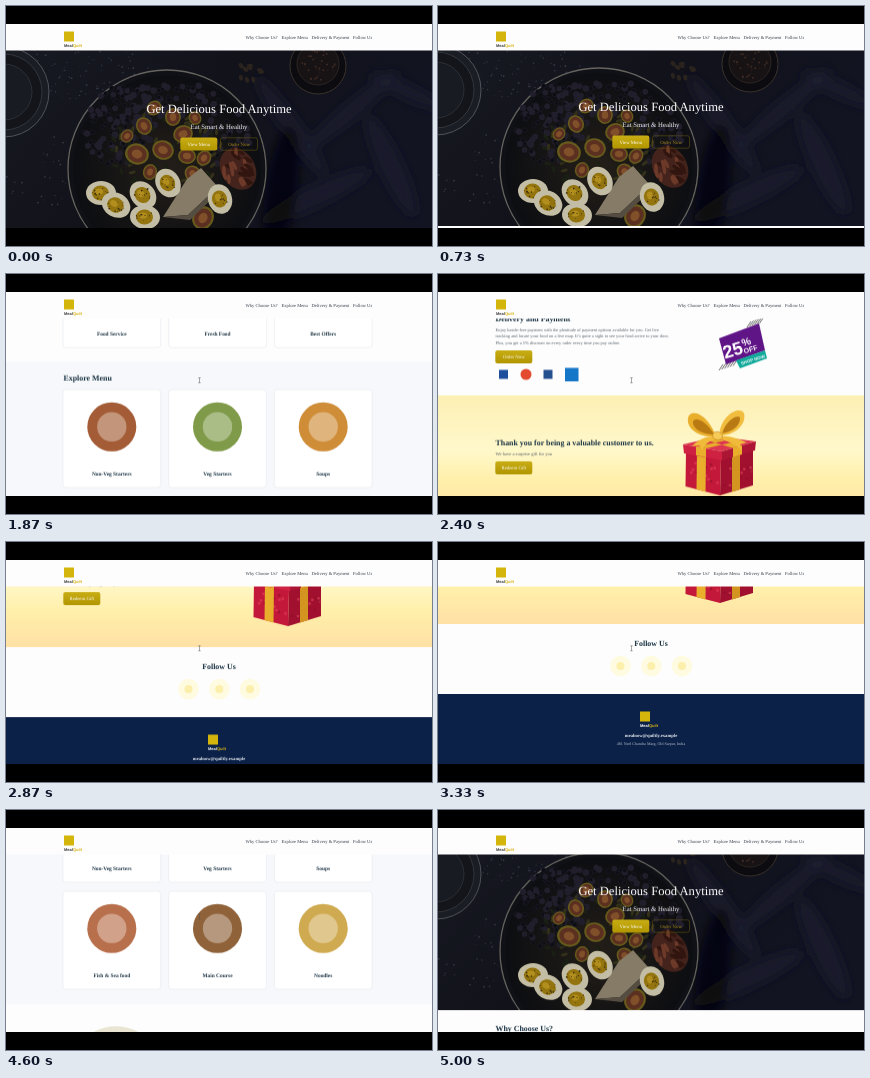
Recreate the animation shown at these times as an HTML page. Size 426x240 px, loop 5.07 s.

```html
<!DOCTYPE html>
<html lang="en">
<head>
<meta charset="utf-8">
<title>Food ordering page</title>
<style>
  html, body { margin: 0; width: 100%; height: 100%; overflow: hidden; background: #000; }
  svg { display: block; width: 100vw; height: 100vh; }
  text { font-family: "Liberation Serif", "Times New Roman", serif; text-rendering: geometricPrecision; white-space: pre; }
  .brand { font-family: "Liberation Sans", Arial, sans-serif; font-weight: bold; }
</style>
</head>
<body>
<svg id="stage" viewBox="0 0 426 240" xmlns="http://www.w3.org/2000/svg"></svg>
<script>
const LOOP = 5070, STEPS = 76;
const INK = '#1c3444', BODY = '#56616b';

// Drawing helpers
const rect = (x, y, w, h, fill, extra = '') =>
  `<rect x="${x}" y="${y}" width="${w}" height="${h}" fill="${fill}" ${extra}/>`;
const disc = (x, y, r, fill, extra = '') =>
  `<circle cx="${x}" cy="${y}" r="${r}" fill="${fill}" ${extra}/>`;
const oval = (x, y, rx, ry, turn, fill, extra = '') =>
  `<ellipse rx="${rx}" ry="${ry}" fill="${fill}" transform="translate(${x} ${y}) rotate(${turn})" ${extra}/>`;
const path = (d, fill, extra = '') => `<path d="${d}" fill="${fill}" ${extra}/>`;
const label = (x, y, size, str, fill, extra = '') =>
  `<text x="${x}" y="${y}" font-size="${size}" fill="${fill}" ${extra}>${str}</text>`;
const MID = 'text-anchor="middle"', BOLD = 'font-weight="bold"';
const heading = (x, y, str, extra = '') => label(x, y, 7.9, str, INK, `${BOLD} ${extra}`);
const lines = (x, y, rows) =>
  rows.map((row, i) => label(x, y + i * 6.6, 4.45, row, BODY)).join('');
const button = (x, y, str) =>
  rect(x, y, 37, 13, 'url(#gold)', 'rx="2"') + label(x + 18.5, y + 8.2, 4.8, str, '#fff', MID);
const shift = (y, body) => `<g transform="translate(0 ${y})">${body}</g>`;

function random(seed) {
  return () => (seed = (seed * 16807) % 2147483647) / 2147483647;
}

function scatter(n, seed, cx, cy, rx, ry, draw) {
  const rnd = random(seed);
  let out = '';
  for (let i = 0; i < n; i++) {
    const a = rnd() * 2 * Math.PI, d = Math.sqrt(rnd());
    out += draw(cx + Math.cos(a) * d * rx, cy + Math.sin(a) * d * ry, rnd());
  }
  return out;
}

const brand = (x, y, first) =>
  rect(x, y, 10, 10, '#d3b50b') +
  `<text class="brand" x="${x}" y="${y + 15.3}" font-size="4" fill="${first}">Meal<tspan fill="#d8b414">Quilt</tspan></text>`;

// Dark table with a round dish of figs, eggs and berries
function hero() {
  const berry = (x, y, v) => disc(x, y, 1.8 + v * 1.4, v > .5 ? '#211e2c' : '#0d0d14', 'stroke="#2b2836" stroke-width=".4"');
  const leaf = (x, y, v) => oval(x, y, 3.5, 1.6, v * 180, v > .5 ? '#33301a' : '#1b2015');
  const crumb = (x, y, v) => disc(x, y, .4 + v * .5, '#363a48');
  const fig = ([x, y, r]) =>
    oval(x, y, r, r * .88, x * 7, '#665a1c') + oval(x, y, r * .82, r * .7, x * 7, '#5c3020') +
    oval(x, y, r * .45, r * .36, x * 7, '#80502a');
  const egg = ([x, y, turn]) =>
    oval(x, y, 15, 12, turn, '#c2bda4') + oval(x - .5, y, 8.5, 7.5, turn, '#94740e') +
    oval(x - 2, y - 1.5, 4, 3, turn, '#b28f1d') +
    scatter(12, x, x, y, 9, 7, (px, py, v) => disc(px, py, .4 + v * .5, '#3d300f'));
  const figs = [[138, 120, 9], [167, 111, 9], [177, 128, 10], [148, 102, 8], [131, 148, 12], [157, 144, 11],
    [181, 150, 9], [144, 166, 8], [189, 112, 7], [121, 130, 7], [187, 168, 9], [198, 152, 8], [197, 212, 12]];
  const eggs = [[95, 187, 0], [110, 199, 30], [137, 189, 50], [139, 211, 5], [162, 177, 60], [214, 193, 75]];
  const folds = [[285, 120, 60, 10, 55], [345, 105, 62, 9, -40], [385, 160, 55, 12, 65], [310, 190, 60, 11, -25], [400, 85, 40, 8, 25]];

  return `<g clip-path="url(#heroClip)">` + rect(0, 40, 426, 182, 'url(#table)') +
    `<g filter="url(#soft)">` + folds.map(f => oval(...f, '#1c1e30', 'opacity=".7"')).join('') +
    oval(275, 185, 16, 65, 8, '#050609', 'opacity=".8"') + `</g>` +
    scatter(90, 61, 70, 65, 75, 28, crumb) + scatter(40, 19, 40, 170, 40, 40, crumb) +
    disc(-2, 86, 45, '#1b1d25', 'stroke="#50535a" stroke-width="1"') +
    disc(-2, 86, 38, '#13151b', 'stroke="#3a3d45" stroke-width=".8"') +
    disc(-2, 86, 28, '#191b23', 'stroke="#3b3e46" stroke-width=".6"') +
    disc(312, 60, 28, '#0c0c10', 'stroke="#3b322c" stroke-width="1"') +
    disc(312, 58, 21, '#171213', 'stroke="#2b2422" stroke-width="1"') +
    scatter(40, 91, 312, 58, 17, 17, (x, y, v) => disc(x, y, 1, v > .5 ? '#3c2b25' : '#241b1a')) +
    scatter(9, 37, 244, 66, 12, 12, (x, y, v) => oval(x, y, 3, 2, v * 180, '#2b231d')) +
    disc(161, 163, 99, '#101116', 'stroke="#66645f" stroke-width="1.3"') +
    disc(161, 163, 94, 'url(#dish)') +
    scatter(130, 17, 113, 120, 36, 40, berry) +
    scatter(70, 53, 168, 94, 45, 18, berry) +
    scatter(60, 29, 217, 130, 27, 30, berry) +
    scatter(75, 71, 163, 145, 58, 42, leaf) +
    figs.map(fig).join('') +
    oval(232, 163, 22, 17, 60, '#43231c') +
    scatter(26, 43, 232, 163, 15, 19, (x, y, v) => oval(x, y, 5, 1.8, 20 + v * 70, v > .5 ? '#6d3a2a' : '#31150f')) +
    path('M157 211L181 173 195 162 212 181 182 209Z', '#857b66') +
    path('M157 211L182 209 212 181 214 185 184 214Z', '#554d41') +
    eggs.map(egg).join('') + `</g>` +
    label(213, 107, 12.6, 'Get Delicious Food Anytime', '#fff', MID) +
    label(213, 122.5, 6.77, 'Eat Smart &amp; Healthy', '#f4f4f4', MID) +
    button(174.3, 131.5, 'View Menu') +
    rect(214.5, 131.8, 37, 12.4, 'none', 'rx="2" stroke="#5e5112" stroke-width=".6"') +
    label(233, 139.7, 4.8, 'Order Now', '#a88d18', MID);
}

const card = (x, y, h, title, tone) =>
  rect(x, y, 97.7, h, '#fff', 'rx="3" stroke="#e6e9ee" stroke-width=".6"') +
  disc(x + 48.8, y + h * .38, h * .25, tone) + disc(x + 48.8, y + h * .38, h * .15, '#fff', 'opacity=".35"') +
  label(x + 48.8, y + h - 12, 5.4, title, INK, `${BOLD} ${MID}`);

const cards = (y, h, items) =>
  items.map(([title, tone], i) => card(57 + (i % 3) * 105.7, y + Math.floor(i / 3) * (h + 9), h, title, tone)).join('');

const why = () => rect(0, 222, 426, 150, '#fdfdfd') +
  heading(57.5, 242.5, 'Why Choose Us?') +
  lines(57.5, 252, ['We use both original recipes and classic versions of famous food items.']) +
  cards(264, 94, [['Food Service', '#e3bf4a'], ['Fresh Food', '#8cb36a'], ['Best Offers', '#d98c6a']]);

const menu = () => rect(0, 372, 426, 248, '#f6f8fb') +
  heading(57.5, 391, 'Explore Menu') +
  cards(400, 98, [['Non-Veg Starters', '#a35c35'], ['Veg Starters', '#7f9a48'], ['Soups', '#cf8d38'],
    ['Fish &amp; Sea food', '#b86f4c'], ['Main Course', '#8f6239'], ['Noodles', '#d0aa50']]);

const healthy = () => rect(0, 620, 426, 140, '#fdfdfd') +
  disc(110, 688, 46, '#e9e5d2') + disc(110, 688, 36, '#93a85a') + oval(104, 680, 18, 12, 25, '#d29a48') +
  heading(196, 664, 'Fresh, Healthy, Organic, Delicious Fruits') +
  lines(196, 675, ['Say no to harmful chemicals and go fully organic with our', 'range of fresh fruits and veggies.']) +
  button(196, 692, 'Watch Video');

function offer() {
  let hatch = '';
  for (let i = 0; i < 6; i++) {
    hatch += `M${309 + i * 2.5} ${54 - i * .8}l4 -6M${281 + i * 2.8} ${97 - i * .9}l4 -6`;
  }
  const word = (x, y, size, str) =>
    `<text class="brand" x="${x}" y="${y}" font-size="${size}" fill="#fff">${str}</text>`;
  return path(hatch, 'none', 'stroke="#333" stroke-width=".7"') +
    path('M281 65L321 50 327 77 288 91Z', '#601587') +
    path('M298 87L327 77 329 85 302 95Z', '#10a99a') +
    `<g transform="translate(287 85.5) rotate(-17)">` + word(0, 0, 18, '25') +
    word(20.5, -6.5, 10.5, '%') + word(20.3, .7, 7, 'OFF') + `</g>` +
    `<g transform="translate(303.5 91.8) rotate(-18)">` + word(0, 0, 4.5, 'SHOP NOW') + `</g>`;
}

const delivery = () => rect(0, 30, 426, 92, '#fdfdfd') +
  heading(57.5, 48, 'Delivery and Payment') +
  lines(57.5, 57.6, [
    'Enjoy hassle-free payment with the plenitude of payment options available for you. Get live',
    'tracking and locate your food on a live map. It’s quite a sight to see your food arrive to your door.',
    'Plus, you get a 5% discount on every order every time you pay online.']) +
  button(57.3, 77, 'Order Now') +
  rect(61, 96.5, 9, 9, '#1d4f9c') + disc(88, 101, 5.5, '#e2492f') +
  rect(105.5, 96.5, 9, 9, '#24508f') + rect(127, 94.5, 13.5, 13.5, '#1677c8') + offer();

function gift() {
  const dots = scatter(34, 83, 282, 196, 32, 17, (x, y, v) => rect(x, y, 2.4, 2.4, v > .5 ? '#8c0f2b' : '#e2485a', 'opacity=".6"'));
  const ribbon = '#e9ae2c', shade = '#b97a14';
  return path('M248 178L283 185 282 222 247.5 213Z', '#c4183a') +
    path('M283 185L315 177 315 212 282 222Z', '#a21030') + dots +
    path('M259 180L268 182 267.5 218.5 258.5 216Z', ribbon) +
    path('M294 182L302 180 302 216 294 218.5Z', '#d39420') +
    path('M245 171L279 163 318 168 284 178Z', '#dc3650') +
    path('M245 171L284 178 284 187 246 180Z', '#cf2242') +
    path('M284 178L318 168 317 177 284 187Z', '#ad1535') +
    path('M258 173.3L268 175 268 184 258 182Z', ribbon) +
    path('M295 174.7L304 172 304 181 295 184Z', ribbon) +
    path('M258 173.3L296 165.5 303 167 268 175ZM266 166L295 174.7 304 172 274 164Z', ribbon) +
    path('M278 163C268 137 251 136 250 145C248 156 263 165 278 163Z', ribbon) +
    path('M276 161C268 147 257 143 255 148C254 155 264 161 276 161Z', shade) +
    path('M281 162C283 141 302 132 306 140C309 151 296 163 281 162Z', '#f1bd3f') +
    path('M284 160C288 147 299 141 302 144C303 151 295 159 284 160Z', shade) +
    path('M276 163C268 163 260 166 254 173L262 172 264 177C267 170 272 167 279 166ZM282 163C292 162 300 166 309 169L302 171 304 177C297 171 290 167 281 166Z', '#f0bb3b') +
    oval(279.5, 162.5, 5, 4, 15, '#f6cb58', `stroke="${shade}" stroke-width=".5"`);
}

const thanks = () => rect(0, 122, 426, 121, 'url(#cream)') +
  heading(57.5, 172, 'Thank you for being a valuable customer to us.') +
  label(57.5, 182, 4.58, 'We have a surprise gift for you', BODY) +
  button(57.3, 188, 'Redeem Gift') + gift();

const follow = () => rect(0, 82, 426, 70, '#fdfdfd') +
  heading(213, 103.5, 'Follow Us', MID) +
  [182.5, 213.3, 244].map(x => disc(x, 124, 10.3, '#fffbe0') + disc(x, 124, 4, '#fbefab')).join('');

const footer = () => rect(0, 152, 426, 72, '#0b2148') + brand(202, 169.5, '#fff') +
  label(213, 194.6, 4.65, 'mealnow@quiltly.example', '#e4e8ee', `${BOLD} ${MID}`) +
  label(213, 202.6, 4, '481 Neel Chandra Marg, Old Sarpur, India', '#b8c0cd', MID);

const nav = () => rect(0, 18, 426, 26.5, '#fdfdfd') + brand(58, 25.5, '#3c3c3c') +
  [[239.5, 'Why Choose Us?'], [275.5, 'Explore Menu'], [305.5, 'Delivery &amp; Payment'], [347, 'Follow Us']]
    .map(([x, str]) => label(x, 32.8, 4.58, str, '#323f4b')).join('');

const fade = (id, stops, dir = 'x2="0" y2="1"') =>
  `<linearGradient id="${id}" ${dir}>` +
  stops.map(([at, c]) => `<stop offset="${at}" stop-color="${c}"/>`).join('') + `</linearGradient>`;

const DELIVERY_TOP = 730, END = DELIVERY_TOP + 161;

document.getElementById('stage').innerHTML = `<defs>` +
  fade('gold', [[0, '#c8ad14'], [1, '#b29600']]) +
  fade('cream', [[0, '#fdf0b4'], [.45, '#fff8cb'], [.7, '#fff0aa'], [1, '#ffe0a6']]) +
  fade('table', [[0, '#181a23'], [.5, '#11121a'], [1, '#121422']], 'x2="1" y2=".4"') +
  `<radialGradient id="dish"><stop offset="0" stop-color="#231e18"/><stop offset="1" stop-color="#0d0e12"/></radialGradient>
  <filter id="soft" x="-20%" y="-20%" width="140%" height="140%"><feGaussianBlur stdDeviation="5"/></filter>
  <clipPath id="heroClip"><rect y="40" width="426" height="182"/></clipPath></defs>` +
  `<g id="page">` + hero() + why() + menu() + healthy() +
  shift(DELIVERY_TOP, delivery() + thanks()) + shift(END, follow() + footer()) + `</g>` +
  path('M192.3 103.8h2.4M193.5 103.8v5M192.3 108.8h2.4', 'none', 'id="caret" stroke="#555" stroke-width=".5"') +
  nav() + rect(0, 0, 426, 18, '#000') + rect(0, 222, 426, 18, '#000');

// Scroll path: time in ms, offset in px, speed in px/ms
const scrollPath = [
  [0, 0, 0], [600, 0, 0], [733, 2, 0], [1400, 2, 0], [2400, DELIVERY_TOP, .4],
  [3130, END, 0], [3900, END, 0], [4133, END - 12, -.14], [5003, 22, -.35], [LOOP, 0, -.2]];

function scrollAt(t) {
  const i = Math.max(1, scrollPath.findIndex(p => p[0] >= t));
  const [t0, y0, v0] = scrollPath[i - 1], [t1, y1, v1] = scrollPath[i];
  const h = t1 - t0, u = (t - t0) / h, w = 1 - u;
  return w * w * (1 + 2 * u) * y0 + u * u * (3 - 2 * u) * y1 + h * u * w * (w * v0 - u * v1);
}

// The picture moves in even steps, each held until the next
function play(id, pose) {
  const frames = [];
  for (let i = 0; i < STEPS; i++) {
    const t = i * LOOP / STEPS;
    frames.push({ offset: Math.max(0, t - 8) / LOOP, easing: 'step-end', ...pose(scrollAt(t)) });
  }
  frames.push({ offset: 1, ...pose(0) });
  document.getElementById(id).animate(frames, { duration: LOOP, iterations: Infinity });
}

play('page', y => ({ transform: `translateY(${-y.toFixed(2)}px)` }));
play('caret', y => ({ opacity: y > 118 ? 1 : 0 }));
</script>
</body>
</html>
```
